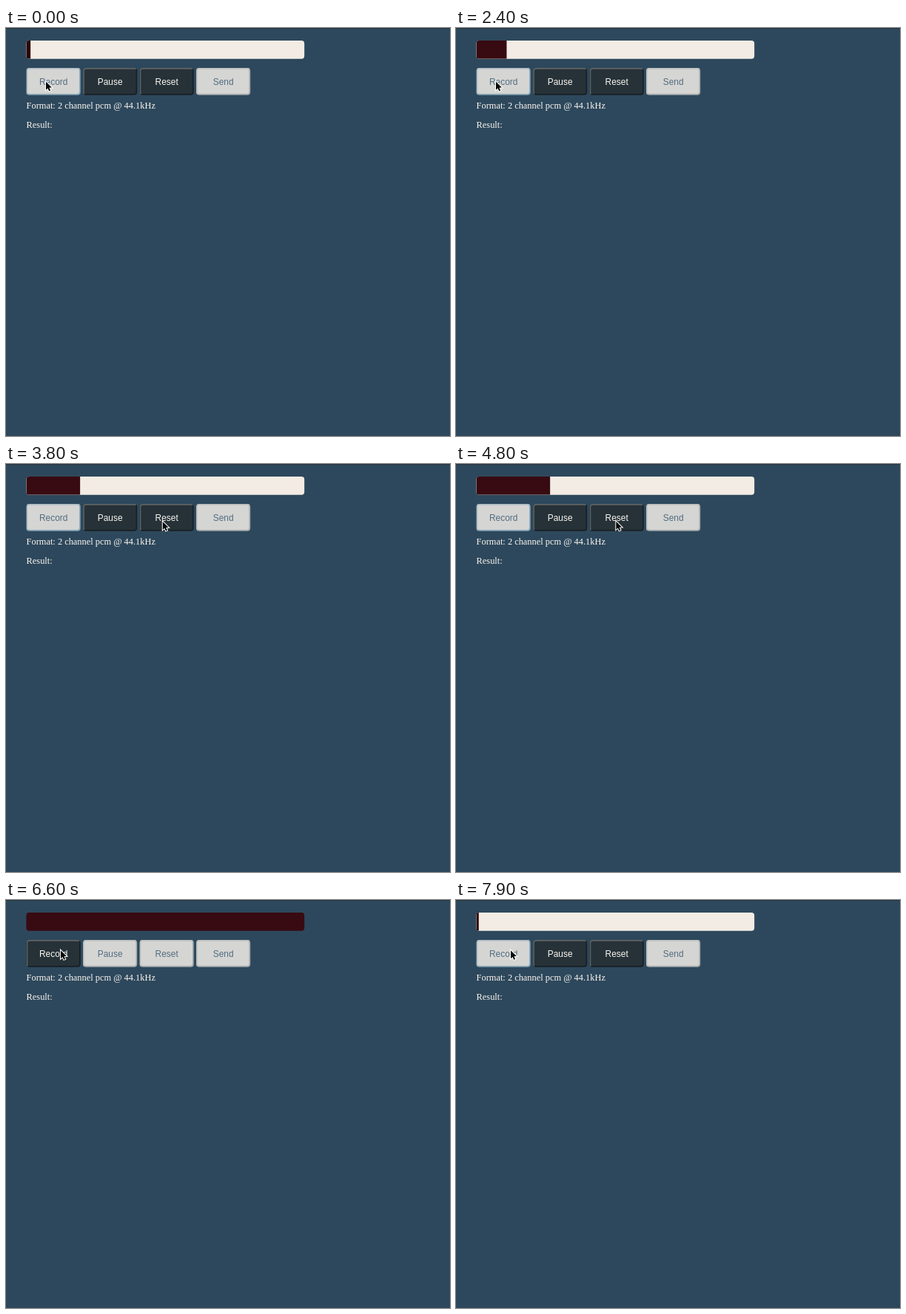
An HTML page with a canvas that plays this animation: 600 px wide and 552 px high, repeating every 8000 ms.

```html
<!DOCTYPE html>
<html lang="en">
<head>
<meta charset="utf-8">
<title>Recorder</title>
<style>
html, body { margin: 0; width: 100%; height: 100%; overflow: hidden; background: #2d485c; }
canvas { display: block; width: 600px; height: 552px; }
</style>
</head>
<body>
<canvas id="stage"></canvas>
<script>
const LOOP = 8000, STEP = 100;
const RESET_AT = 5700, RECORD_AT = 7100;
const BAR = { x: 27.4, y: 17, w: 375.8, h: 24.8 };
const BUTTON = { x: 27.6, y: 54, w: 73.1, h: 36.7, pitch: 76.5 };
const SANS = '11.9px "Liberation Sans", Arial, sans-serif';
const SERIF = '12.39px "Liberation Serif", "Times New Roman", serif';
const CREAM = '#f3ece4', TEXT = '#fbf6f0';

const ACTIVE = { face: '#263238', light: '#5f6463', dark: '#191f23', text: TEXT };
const DISABLED = { face: '#d5d5d3', light: '#bcc0bf', dark: '#a7adae', text: '#526d81' };
const FOCUSED = { ...DISABLED, light: '#b0bec5', dark: '#8dabbd' };

const canvas = document.getElementById('stage');
const ctx = canvas.getContext('2d');
const dpr = window.devicePixelRatio || 1;
canvas.width = 600 * dpr;
canvas.height = 552 * dpr;
ctx.scale(dpr, dpr);

const home = { x: 54, y: 72.8 };
const moves = [
  { from: 2600, to: 3700, x: 211.8, y: 78 },
  { from: 4500, to: 5200, x: 223.3, y: 77.2 },
  { from: 5900, to: 6600, x: 74, y: 68.2 },
];

const smooth = p => p * p * (3 - 2 * p);
const clamp = p => Math.min(1, Math.max(0, p));

function cursorAt(t) {
  return moves.reduce((pos, m) => {
    const p = smooth(clamp((t - m.from) / (m.to - m.from)));
    return { x: pos.x + (m.x - pos.x) * p, y: pos.y + (m.y - pos.y) * p };
  }, home);
}

// the bar grows as a power of the time since the last press of Record
function progress(t) {
  if (t >= RESET_AT && t < RECORD_AT) return BAR.w;
  const seconds = ((t - RECORD_AT + LOOP) % LOOP) / 1000;
  return 4.88 * Math.pow(seconds + (t < RESET_AT ? 0.2 : 0), 1.7);
}

function fillRound(x, y, w, h, r, color) {
  ctx.beginPath();
  ctx.roundRect(x, y, w, h, r);
  ctx.fillStyle = color;
  ctx.fill();
}

function label(text, x, y, font, color, align = 'left') {
  ctx.font = font;
  ctx.fillStyle = color;
  ctx.textAlign = align;
  ctx.fillText(text, x, y);
}

function drawBar(filled) {
  const { x, y, w, h } = BAR;
  const full = filled >= w;
  const dark = filled < 10 ? '#2b0307' : '#380b12';
  fillRound(x, y, w, h, 4, full ? dark : CREAM);
  if (full) return;
  ctx.save();
  ctx.beginPath();
  ctx.rect(x, y, filled, h);
  ctx.clip();
  fillRound(x, y, w, h, 4, dark);
  ctx.restore();
}

function drawButton(text, index, style) {
  const { y, w, h } = BUTTON;
  const x = BUTTON.x + index * BUTTON.pitch;
  fillRound(x, y, w, h, 4, style.dark);
  // lit top and left edges
  ctx.save();
  ctx.clip();
  ctx.fillStyle = style.light;
  ctx.beginPath();
  ctx.moveTo(x, y);
  ctx.lineTo(x + w, y);
  ctx.lineTo(x + w - 4, y + 4);
  ctx.lineTo(x + 4, y + h - 4);
  ctx.lineTo(x, y + h);
  ctx.fill();
  ctx.restore();
  fillRound(x + 1.7, y + 1.7, w - 3.4, h - 3.4, 2.4, style.face);
  label(text, x + w / 2, 76.8, SANS, style.text, 'center');
}

function drawCursor({ x, y }) {
  ctx.save();
  ctx.translate(x, y);
  const arrow = new Path2D('M0 0V11L2.5 8.7L4.2 12.5L6.1 11.7L4.4 8L7.8 7.8Z');
  ctx.lineWidth = 2;
  ctx.strokeStyle = '#fff';
  ctx.stroke(arrow);
  ctx.fillStyle = '#050505';
  ctx.fill(arrow);
  ctx.restore();
}

function draw(t) {
  const idle = t >= RESET_AT && t < RECORD_AT;
  const enabled = idle ? ['Record'] : ['Pause', 'Reset'];
  ctx.fillStyle = '#2d485c';
  ctx.fillRect(0, 0, 600, 552);
  ctx.fillStyle = '#2a3238';
  ctx.fillRect(0, 0, 600, 1);
  drawBar(progress(t));
  ['Record', 'Pause', 'Reset', 'Send'].forEach((text, i) => {
    const off = text === 'Record' ? FOCUSED : DISABLED;
    drawButton(text, i, enabled.includes(text) ? ACTIVE : off);
  });
  label('Format: 2 channel pcm @ 44.1kHz', 27.6, 109.2, SERIF, TEXT);
  label('Result:', 27.6, 135.4, SERIF, TEXT);
  drawCursor(cursorAt(t));
}

const start = performance.now();
function tick() {
  const t = (performance.now() - start) % LOOP;
  draw(Math.floor(t / STEP) * STEP);
  requestAnimationFrame(tick);
}
tick();
</script>
</body>
</html>
```
